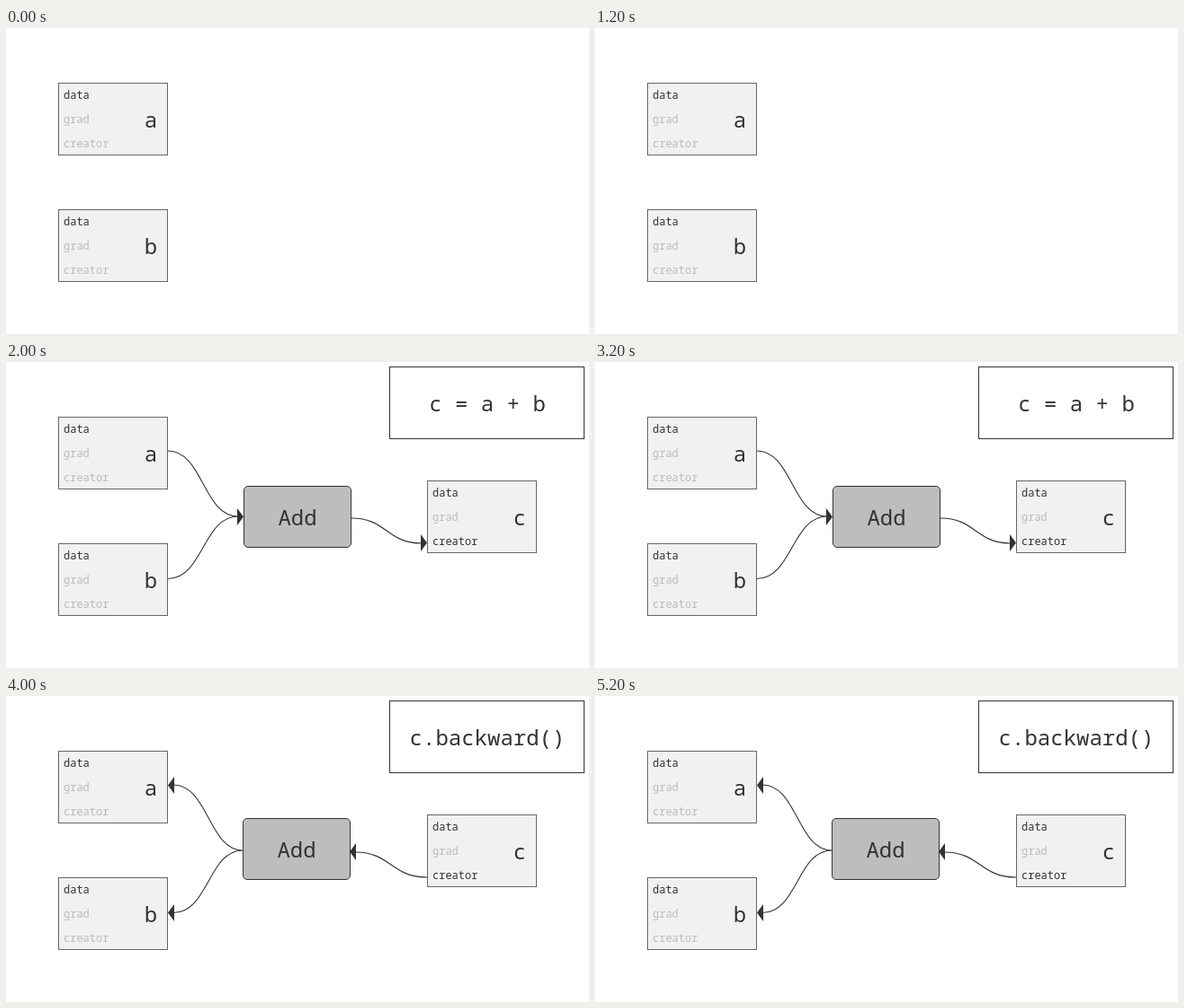
Write an HTML page that moves like this. It is 648 px wide and 341 px high and loops after 6000 ms.

```html
<!DOCTYPE html>
<html lang="en">
<head>
<meta charset="utf-8">
<title>Backward pass through an Add node</title>
<style>
  html, body { margin: 0; width: 100%; height: 100%; overflow: hidden; background: #fff; }
  svg { display: block; width: 648px; height: 341px; }
  text { font: 12px "Noto Sans Mono", "DejaVu Sans Mono", monospace; fill: #333; white-space: pre; }
  .big { font-size: 24px; text-anchor: middle; }
  .off { fill: #bbb; }
  .box { fill: #f1f1f1; stroke: #666; }
  .frame { fill: #fff; stroke: #333; }
  .op { fill: #bdbdbd; stroke: #333; }
  .wire { fill: none; stroke: #333; stroke-width: 1.1; }
  .head { fill: #333; }

  .built, .forward, .backward, .grad { animation: 6s step-end infinite; }
  .built { animation-name: built; }
  .forward { animation-name: forward; }
  .backward { animation-name: backward; }
  .grad { animation-name: grad; }
  @keyframes built { 0% { opacity: 0 } 33.33333%, 100% { opacity: 1 } }
  @keyframes forward { 0% { opacity: 0 } 33.33333% { opacity: 1 } 66.66667%, 100% { opacity: 0 } }
  @keyframes backward { 0% { opacity: 0 } 66.66667%, 100% { opacity: 1 } }
  @keyframes grad { 0% { fill: #bbb } 66.66667%, 100% { fill: #333 } }
</style>
</head>
<body>
<svg viewBox="0 0 648 341">
  <defs>
    <g id="variable">
      <rect class="box" x=".5" y=".5" width="121" height="80"/>
      <text x="6" y="18">data</text>
      <text class="grad" x="6" y="45">grad</text>
    </g>
    <g id="add">
      <rect class="op" x=".5" y=".5" width="119" height="68" rx="4.5"/>
      <text class="big" x="60" y="44">Add</text>
    </g>
    <path id="right" class="head" d="M0 0l-7 -9.5v19z"/>
    <path id="left" class="head" d="M0 0l7 -9.5v19z"/>
  </defs>

  <g transform="translate(58 61)">
    <use href="#variable"/>
    <text class="off" x="6" y="72">creator</text>
    <text class="big" x="103" y="50">a</text>
  </g>
  <g transform="translate(58 202)">
    <use href="#variable"/>
    <text class="off" x="6" y="72">creator</text>
    <text class="big" x="103" y="50">b</text>
  </g>

  <g class="built">
    <g transform="translate(468 132)">
      <use href="#variable"/>
      <text x="6" y="72">creator</text>
      <text class="big" x="103" y="50">c</text>
    </g>
    <rect class="frame" x="426.5" y="5.5" width="216" height="80"/>
  </g>

  <g class="forward">
    <text class="big" x="535" y="55">c = a + b</text>
    <path class="wire" d="M180 99C219 99 219 172 258 172M180 241.5C219 241.5 219 172 258 172M384 174C423 174 423 202 462 202"/>
    <use href="#right" x="264" y="172.5"/>
    <use href="#right" x="468" y="201.5"/>
    <use href="#add" x="264" y="138"/>
  </g>

  <g class="backward">
    <text class="big" x="535" y="55">c.backward()</text>
    <path class="wire" d="M263 172C225 172 225 99 186 99M263 172C225 172 225 241.5 186 241.5M468 202C428 202 428 174 388 174"/>
    <use href="#left" x="180" y="99.5"/>
    <use href="#left" x="180" y="241.5"/>
    <use href="#left" x="382" y="173.5"/>
    <use href="#add" x="263" y="136"/>
  </g>
</svg>
</body>
</html>
```
